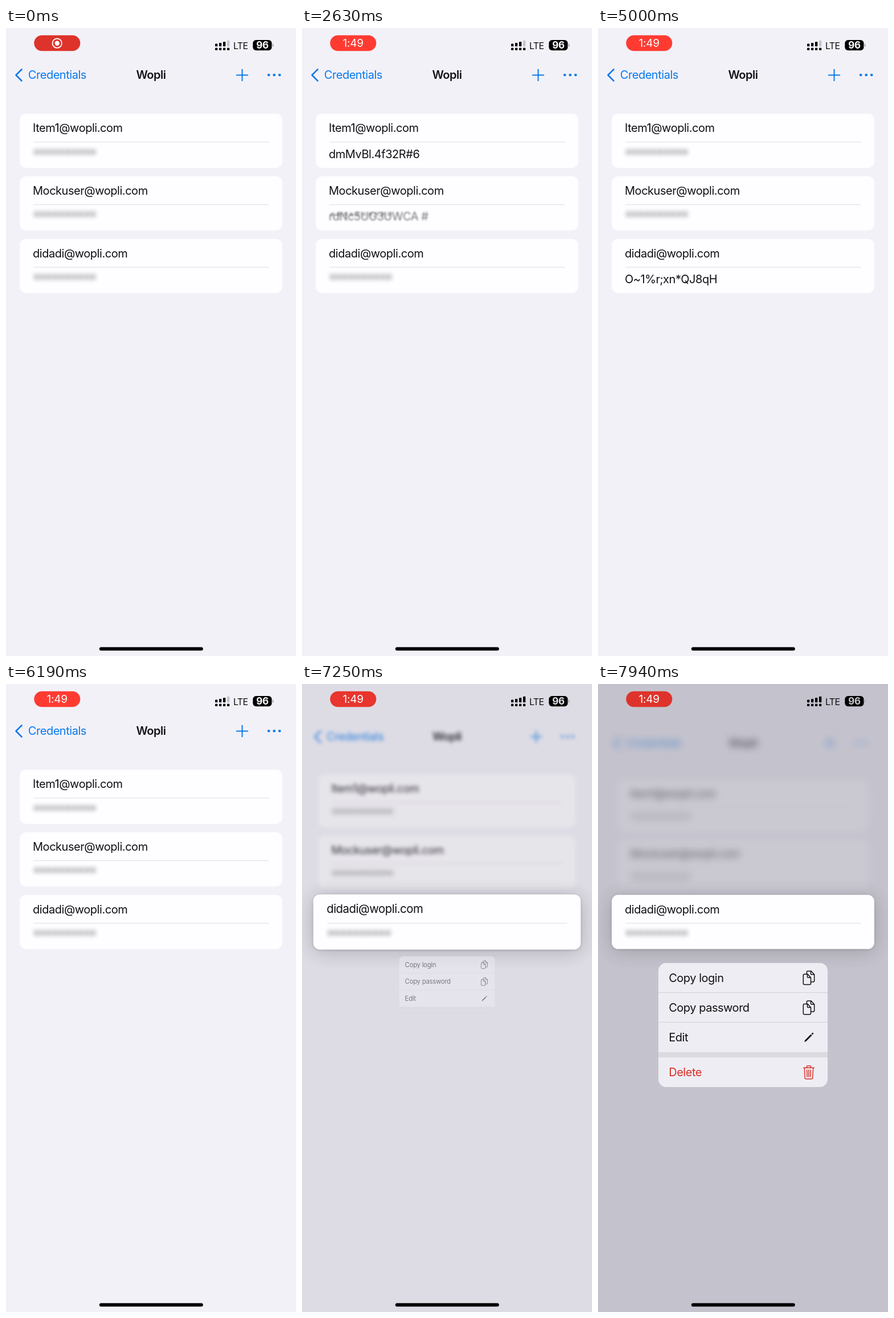
Recreate the animation shown at these times as an HTML page. Size 509x1100 px, loop 8 s.

```html
<!DOCTYPE html>
<html lang="en">
<head>
<meta charset="utf-8">
<title>Credentials</title>
<style>
  html, body { margin: 0; width: 100%; height: 100%; overflow: hidden; background: #f2f1f8; }
  svg { display: block; width: 100vw; height: 100vh; }
  text { font: 400 20px Inter, "Liberation Sans", sans-serif; letter-spacing: -.46px; fill: #111114; white-space: pre; }
  .title { font-weight: 600; }
  .blue { fill: #0a7aeb; }
  .line { fill: none; stroke-linecap: round; stroke-linejoin: round; }
  .icon { fill: none; stroke: #111114; stroke-width: 1.5; stroke-linecap: round; stroke-linejoin: round; }
  .red { fill: #d92f26; }
  .icon.red { fill: none; stroke: #d92f26; }
</style>
</head>
<body>
<svg id="stage" viewBox="0 0 509 1100" preserveAspectRatio="none"></svg>
<script>
const LOOP = 8000;
const CX = 254.5;
const CARD_H = 95;
const LIFT_Y = 416.7;
const REVEAL = 350;
const MENU = { x: 106, y: 488.5, w: 297, h: 217.5 };

const rows = [
  { login: "Item1@wopli.com", secret: "dmMvBl.4f32R#6", y: 150, on: 1450, off: 3450 },
  { login: "Mockuser@wopli.com", secret: "rdNc5UG3UWCA #", y: 259.7, on: 2440, off: 4440 },
  { login: "didadi@wopli.com", secret: "O~1%r;xn*QJ8qH", y: 369.3, on: 3690, off: 5690 }
];

const times = (n, fn) => Array.from({ length: n }, (_, i) => fn(i)).join("");
const clamp = v => Math.min(1, Math.max(0, v));
const smooth = (a, b, v) => { const x = clamp((v - a) / (b - a)); return x * x * (3 - 2 * x); };
const mix = (a, b, p) => a + (b - a) * p;

function card({ login, secret, y }, i) {
  const stars = times(10, k => `<text x="${53.5 + 11 * k}" y="${y + 77.5}" text-anchor="middle">*</text>`);
  return `
    <rect x="24" y="${y}" width="461" height="${CARD_H}" rx="11.5" fill="#fefdff"/>
    <text x="47" y="${y + 32.4}">${login}</text>
    <rect x="48" y="${y + 49.2}" width="413.5" height="1.2" fill="#e4e3e8"/>
    <g id="stars${i}">${stars}</g>
    <text id="secret${i}" x="47" y="${y + 77.5}">${secret}</text>`;
}

const copyIcon = `<path class="icon" d="M-7.7-6.5H-2L3.5-.5V9.8Q3.5 11.8 1.5 11.8H-7.7Q-9.7 11.8-9.7 9.8V-4.5Q-9.7-6.5-7.7-6.5Z
  M-2.5-6.5V-1.5Q-2.5-.5-1.5-.5H3.5 M-3.6-6.5V-10Q-3.6-12-1.6-12H4L9.7-6V5Q9.7 7 7.7 7H3.5
  M3.5-12V-7Q3.5-6 4.5-6H9.7"/>`;
const pencilIcon = `<path d="M-8 8L-6.6 4.6L3.6-5.6L5.6-3.6L-4.6 6.6ZM4.6-6.6L6-8Q7-8.6 7.8-7.8Q8.6-7 8-6L6.6-4.6Z" fill="#111114"/>`;
const trashIcon = `<path class="icon red" d="M-9.3-8H9.3M-3.5-8V-10Q-3.5-11.5-2-11.5H2Q3.5-11.5 3.5-10V-8
  M-7.7-8L-6.8 9.5Q-6.7 11.5-4.7 11.5H4.7Q6.7 11.5 6.8 9.5L7.7-8M-3.2-4.3L-2.8 7.8M0-4.3V7.8M3.2-4.3L2.8 7.8"/>`;

function menuItem(label, mid, icon, cls = "") {
  return `<text class="${cls}" x="18.2" y="${mid + 7.2}">${label}</text>
    <g transform="translate(264 ${mid})">${icon}</g>`;
}

const signal = times(4, i => {
  const x = 367 + 7 * i, top = [27.6, 26, 24, 21.8][i];
  return `<rect ${i === 3 ? 'id="bar"' : ""} x="${x}" y="${top}" width="4.3" height="${32.2 - top}" rx="1.2"/>
    <rect x="${x}" y="34.8" width="4.3" height="4.2" rx="1.2"/>`;
});

document.getElementById("stage").innerHTML = `
  <defs><clipPath id="menuClip"><rect id="menuMask" width="${MENU.w}" height="${MENU.h}" rx="14"/></clipPath></defs>
  <rect width="509" height="1100" fill="#f2f1f8"/>
  <g id="page">
    <path class="line" d="M27.5 72.5L17.5 82.5L27.5 92.5" stroke="#0a7aeb" stroke-width="2.6"/>
    <text class="blue" x="38.8" y="89.3">Credentials</text>
    <text class="title" x="${CX}" y="89.3" text-anchor="middle">Wopli</text>
    <path class="line" d="M404.8 82.5H424.2M414.5 72.8V92.2" stroke="#0a7aeb" stroke-width="2"/>
    ${times(3, i => `<circle class="blue" cx="${461.2 + 9.5 * i}" cy="82.3" r="2.3"/>`)}
    ${card(rows[0], 0)}${card(rows[1], 1)}
  </g>
  <rect id="dim" width="509" height="1100" fill="#9896a4"/>
  <g id="lift">
    <g id="shadow">
      <rect x="24" y="373" width="461" height="${CARD_H}" rx="12" opacity=".24" style="filter:blur(18px)"/>
      <rect x="24" y="370" width="461" height="${CARD_H}" rx="12" opacity=".22" style="filter:blur(2px)"/>
    </g>
    ${card(rows[2], 2)}
  </g>
  <g id="menu"><g clip-path="url(#menuClip)">
    <rect width="${MENU.w}" height="${MENU.h}" fill="#efedf4"/>
    <path d="M0 52H297M0 104H297" stroke="#d2d0d7" stroke-width="1.1"/>
    <rect y="156.3" width="${MENU.w}" height="9.4" fill="#dcdae0"/>
    ${menuItem("Copy login", 26.2, copyIcon)}
    ${menuItem("Copy password", 78.4, copyIcon)}
    ${menuItem("Edit", 130.6, pencilIcon)}
    ${menuItem("Delete", 191.8, trashIcon, "red")}
  </g></g>
  <rect id="pill" x="49.3" y="12.8" width="81" height="27.4" rx="13.7"/>
  <g id="record">
    <circle cx="89.7" cy="26.7" r="8.2" fill="none" stroke="#fff" stroke-width="1.8"/>
    <circle cx="89.7" cy="26.7" r="4.2" fill="#fff"/>
  </g>
  <text id="clock" x="89.7" y="33.4" text-anchor="middle" style="font-size:19px;letter-spacing:-.2px;fill:#fff">1:49</text>
  ${signal}
  <text x="399" y="37" style="font-size:16px;letter-spacing:-.7px">LTE</text>
  <rect x="433.3" y="21" width="33.2" height="18.2" rx="5.6"/>
  <path d="M467.8 27.3Q470 28.2 470 30.1Q470 32 467.8 32.9Z" fill="#a9a8ae"/>
  <text id="charge" x="450" y="36.3" text-anchor="middle" style="font-size:17px;font-weight:700;letter-spacing:-.2px">96</text>
  <rect x="163.8" y="1084.6" width="182" height="5.8" rx="2.9"/>`;

const el = {};
document.querySelectorAll("#stage [id]").forEach(n => el[n.id] = n);

const rgb = (a, b, p) => `rgb(${a.map((v, i) => Math.round(mix(v, b[i], p))).join()})`;
const blur = px => px > .05 ? `blur(${px.toFixed(2)}px)` : "none";
const scaleAt = (s, x, y) => `translate(${x} ${y}) scale(${s}) translate(${-x} ${-y})`;

function drawSecrets(t) {
  rows.forEach(({ on, off }, i) => {
    const p = smooth(on, on + REVEAL, t) - smooth(off, off + REVEAL, t);
    const stars = el["stars" + i].style, secret = el["secret" + i].style;
    stars.opacity = .85 * (1 - p);
    secret.opacity = p;
    stars.filter = secret.filter = blur(4 * (1 - p));
  });
}

function drawStatus(t, open) {
  const period = 3850;
  const away = Math.abs(t - period * Math.round(t / period));
  el.pill.setAttribute("fill", rgb([222, 51, 43], [255, 59, 49], smooth(250, 800, away)));
  const clock = smooth(500, 800, t);
  el.clock.style.opacity = clock;
  el.record.style.opacity = 1 - clock;
  el.bar.setAttribute("fill", t < 6700 ? "#c6c5cb" : "#000");
  el.charge.style.fill = rgb([255, 255, 255], [200, 199, 208], open);
}

function drawMenu(t, open) {
  const left = 1 - open;
  const press = smooth(6700, 7190, t);
  el.page.setAttribute("transform", scaleAt(1 - .045 * open, CX, 550));
  el.page.style.filter = blur(6.5 * open);
  el.dim.style.opacity = .5 * open;
  el.lift.setAttribute("transform", scaleAt(1 + .035 * press * left, CX, LIFT_Y));
  el.shadow.style.opacity = press * mix(1, .8, open);

  const scale = 1 - .82 * left;
  el.menu.setAttribute("transform",
    `translate(${CX - MENU.w / 2 * scale} ${MENU.y - 22 * left}) scale(${scale})`);
  el.menu.style.opacity = open;
  el.menuMask.setAttribute("height", MENU.h * (1 - .44 * left));
}

function draw(t) {
  // critically damped spring
  const w = .0284 * Math.max(0, t - 7195);
  const open = 1 - (1 + w) * Math.exp(-w);
  drawSecrets(t);
  drawStatus(t, open);
  drawMenu(t, open);
}

function frame() {
  draw(performance.now() % LOOP);
  requestAnimationFrame(frame);
}
frame();
</script>
</body>
</html>
```
